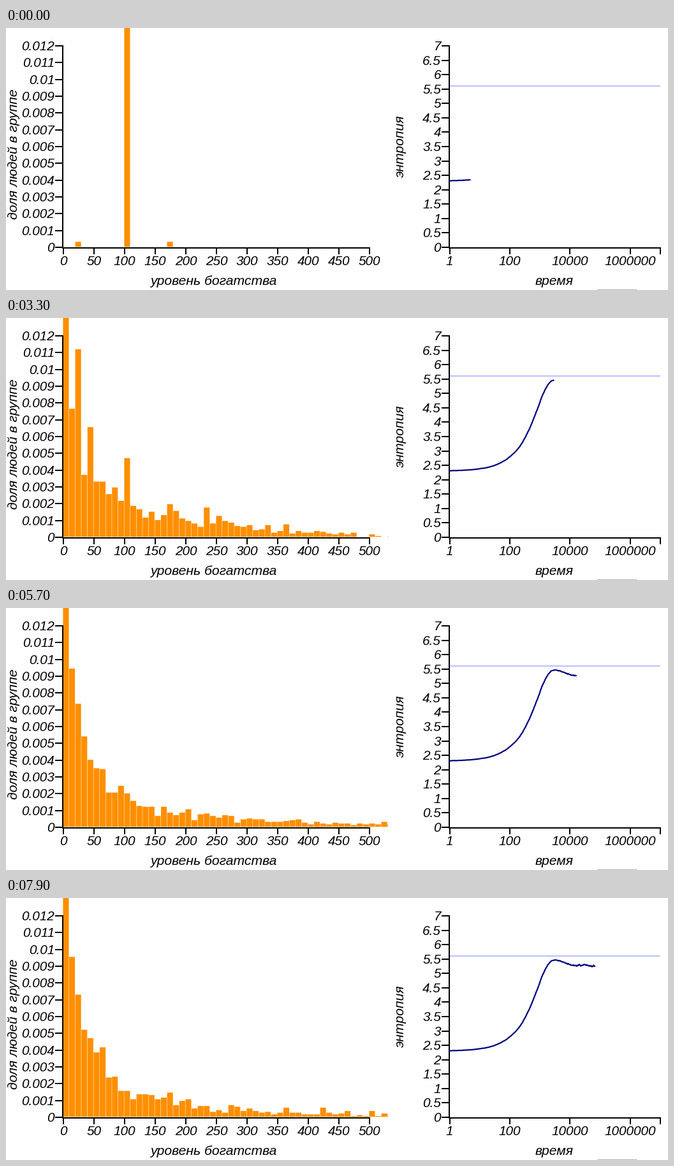
These frames come from a looping animation (1038x411 px, 8000 ms). A matplotlib script:

```python
import random

import numpy as np
import matplotlib.pyplot as plt
from matplotlib.animation import FuncAnimation
from matplotlib.patches import Rectangle

W, H, DPI = 1038, 411, 64
FRAMES, STEP = 80, 100
ORANGE, NAVY, PALE = "#ff8f00", "#000080", "#bfbfff"

PEOPLE, START, SHARE = 2000, 100.0, 0.75
RATE = 1.3                      # exchanges per unit of time
BIN, SHOWN = 10, 54             # group width in wealth, groups drawn
BAR_X, BIN_W, BAR_W, RIGHT = 89.4, 9.6, 9.1, 599
BASE, UNIT = 343.3, 1.3135      # bar foot and pixels per person
T_X, DECADE = 695.5, 47.17      # log time axis
ZERO_Y, AXIS_H = 344, 316


def clock(n):
    """Model time reached at frame n; it speeds up as the run goes on."""
    return 5 + 1000 * (np.cosh(n / 16) - 1)


def simulate(times):
    """Random pairs meet; the loser hands over a share of his wealth."""
    rng = random.Random(4)
    wealth = [START] * PEOPLE
    done, shown, entropy = 0, [], []
    for t in times:
        while done < round(RATE * t):
            loser, winner = rng.sample(range(PEOPLE), 2)
            loss = SHARE * wealth[loser]
            wealth[loser] -= loss
            wealth[winner] += loss
            done += 1
        sizes = np.bincount((np.array(wealth) // BIN).astype(int),
                            minlength=SHOWN)
        p = sizes[sizes > 0] / PEOPLE
        shown.append(sizes[:SHOWN])
        entropy.append(np.log(BIN) - np.sum(p * np.log(p)))
    return shown, np.array(entropy)


fig = plt.figure(figsize=(W / DPI, H / DPI), dpi=DPI, facecolor="white")
ax = fig.add_axes([0, 0, 1, 1])
ax.set_xlim(0, W)
ax.set_ylim(H, 0)
ax.axis("off")


def line(xs, ys, color="black", width=2, **kw):
    return ax.plot(xs, ys, color=color, lw=width * 72 / DPI,
                   solid_capstyle="butt", **kw)[0]


def box(x, y, w, h, color):
    return ax.add_patch(Rectangle((x, y), w, h, color=color, lw=0, snap=False))


def label(x, y, text, ha="center", size=20.7, turn=0):
    ax.text(x, y, text, ha=ha, va="baseline", rotation=turn,
            rotation_mode="anchor", family="Liberation Sans", style="italic",
            size=size * 72 / DPI)


def title(x, y, text, turn=0):
    label(x, y, text, size=21.1, turn=turn)


def y_axis(x, step, count):
    line([x, x], [27, 346])
    for i in range(count + 1):
        y = ZERO_Y - AXIS_H * i / count
        line([x - 12, x], [y, y])
        label(x - 13, y + 7, f"{i * step:g}", "right")


def x_axis(left, right, ticks):
    line([left, right + 1], [345, 345])
    for x, text in ticks:
        line([x, x], [344, 354.5])
        label(x, 372, text)


y_axis(89, 0.001, 12)
x_axis(88, 570, [(90 + 48 * i, str(50 * i)) for i in range(11)])
y_axis(695, 0.5, 14)
x_axis(694, 1026, [(T_X + 2 * DECADE * i, str(100 ** i)) for i in range(4)]
       + [(1026, "")])
title(325.5, 403, "уровень богатства")
title(860, 403, "время")
title(18, 197.5, "доля людей в группе", 90)
title(624, 185, "энтропия", 90)
line([696, 1026], [91, 91], PALE)
for x in range(928, 990, 2):
    box(x, 410, 1, 1, "#606060")

bars = []
for j in range(SHOWN):
    x = BAR_X + BIN_W * j
    bars.append(box(x, BASE, min(BAR_W, RIGHT - x), 0, ORANGE))
curve = line([], [], NAVY, 2.2, solid_joinstyle="round")

marks = clock(np.arange(FRAMES))
times = np.sort(np.append(marks, 10 ** np.arange(0, np.log10(marks[-1]), 0.03)))
groups, entropy = simulate(times)
curve_x = T_X + DECADE * np.log10(times)
curve_y = ZERO_Y - AXIS_H / 7 * entropy


def draw(n):
    last = np.searchsorted(times, marks[n])
    for bar, size in zip(bars, groups[last]):
        bar.set_height(-UNIT * size)
    curve.set_data(curve_x[:last + 1], curve_y[:last + 1])
    return bars + [curve]


anim = FuncAnimation(fig, draw, frames=FRAMES, interval=STEP, repeat=True,
                     repeat_delay=0, blit=False)
plt.show()
```
